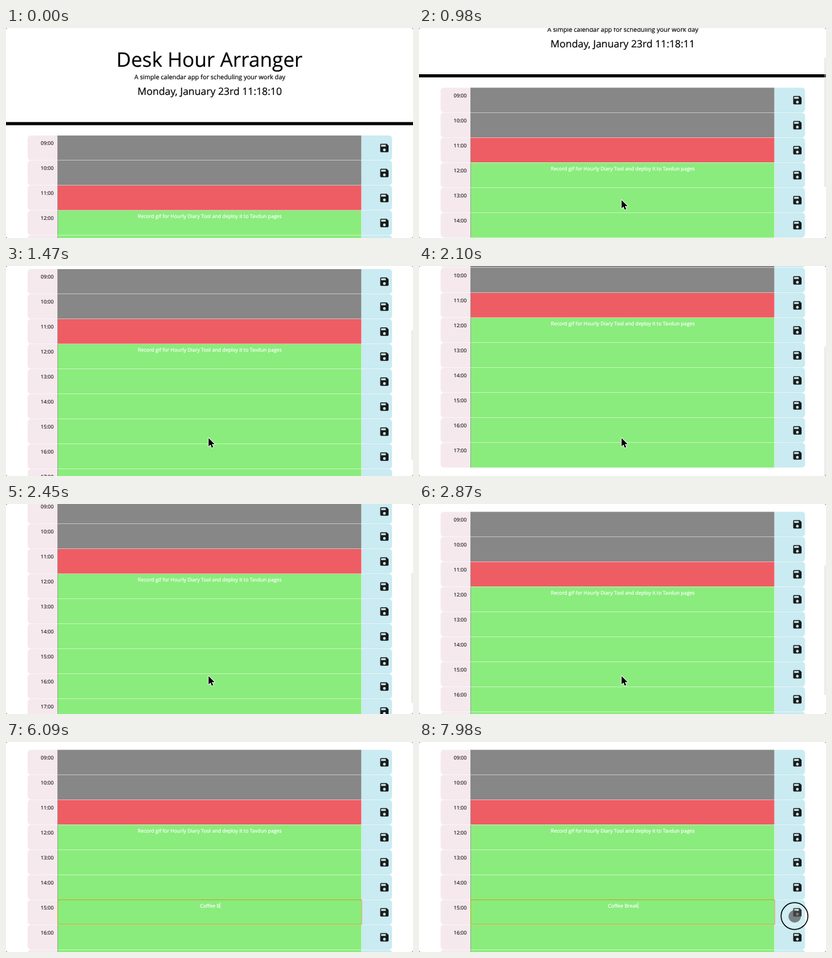
Animation, 650 px wide and 336 px high, one loop 8000 ms. Source, as an HTML page with a canvas:

```html
<!DOCTYPE html>
<html lang="en">
<head>
<meta charset="utf-8">
<title>Desk Hour Arranger</title>
<style>
  html, body { margin: 0; width: 100%; height: 100%; overflow: hidden; background: #fff; }
  canvas { display: block; }
</style>
</head>
<body>
<canvas id="stage" width="650" height="336"></canvas>
<script>
const ctx = document.getElementById('stage').getContext('2d');
const W = 650, H = 336, LOOP = 8000, STEP = 70;
const FIRST_ROW = 172, PITCH = 40, ROW_H = 39.4;
const GREY = '#878787', RED = '#ee5d64', GREEN = '#8aec7c';
const EVENT = 'Record gif for Hourly Diary Tool and deploy it to Tavdun pages';
const TYPED = 'Coffee Break';
const KEY_TIMES = [4340, 4620, 4900, 4970, 5250, 5390, 5740, 6090, 6440, 6580, 6720, 6930];

// [time, scroll offset]: two flicks down, then a gentle one back up
const SCROLL = [
  [700, 0], [770, 5], [840, 24], [910, 50], [980, 76.5], [1120, 112], [1260, 133],
  [1400, 149], [1470, 167], [1540, 207], [1960, 210], [2030, 210], [2100, 209],
  [2170, 206], [2310, 194], [2450, 180], [2590, 169], [2730, 162], [2870, 159.5]
];

const saveIcon = new Path2D(
  'M17 3H5c-1.1 0-2 .9-2 2v14c0 1.1.9 2 2 2h14c1.1 0 2-.9 2-2V7z' +
  'M12 19a3 3 0 1 1 0-6a3 3 0 1 1 0 6zM15 9H5V5h10z');
const arrow = new Path2D('M0 0V14.6L3.3 11.5L5.6 16.8L8 15.8L5.8 10.6H10.4Z');

function keyed(keys, t) {
  if (t <= keys[0][0]) return keys[0][1];
  for (let i = 1; i < keys.length; i++) {
    const [t0, a] = keys[i - 1], [t1, b] = keys[i];
    if (t <= t1) return a + (b - a) * (t - t0) / (t1 - t0);
  }
  return keys[keys.length - 1][1];
}

function rect(x, y, w, h, color, radii = 0) {
  ctx.fillStyle = color;
  ctx.beginPath();
  ctx.roundRect(x, y, w, h, radii);
  ctx.fill();
}

// A hairline stroke gives the text a slightly heavier, smoothed weight
function text(str, x, y, size, color = '#000', align = 'center') {
  ctx.textRendering = 'geometricPrecision';
  ctx.font = `${size}px "Open Sans", sans-serif`;
  ctx.textAlign = align;
  ctx.fillStyle = ctx.strokeStyle = color;
  ctx.lineWidth = 0.2;
  ctx.lineJoin = 'round';
  ctx.fillText(str, x, y);
  ctx.strokeText(str, x, y);
}

function drawHeader(scroll, t) {
  text('Desk Hour Arranger', 325, 62 - scroll, 32);
  text('A simple calendar app for scheduling your work day', 325.5, 82 - scroll, 10);
  text(`Monday, January 23rd 11:18:${t < 840 ? 10 : 11}`, 325.3, 107 - scroll, 16);
  rect(0, 150.5 - scroll, W, 5, '#000');
}

function drawRow(hour, y) {
  const color = hour < 11 ? GREY : hour === 11 ? RED : GREEN;
  rect(34.5, y, 48, ROW_H, '#f5e9ee', [5, 0, 0, 5]);
  rect(568, y, 48.5, ROW_H, '#c9ebf1', [0, 5, 5, 0]);
  rect(82.5, y, 485, ROW_H, color);
  rect(82.4, y, 0.6, ROW_H, '#777');
  text(`${String(hour).padStart(2, '0')}:00`, 76, y + 15.3, 8, '#222', 'right');
  if (hour === 12) text(EVENT, 325.5, y + 12, 8, '#fff');

  ctx.save();
  ctx.translate(604.3, y + 20);
  ctx.scale(0.74, 0.74);
  ctx.translate(-12, -12);
  ctx.fillStyle = '#1a1a1a';
  ctx.fill(saveIcon, 'evenodd');
  ctx.restore();
}

function drawField(y, t) {
  if (t < 3290) return;
  ctx.strokeStyle = '#c6a02c';
  ctx.lineWidth = 1;
  ctx.strokeRect(82.5, y, 485.5, ROW_H);
  const str = TYPED.slice(0, KEY_TIMES.filter(k => k <= t).length);
  text(str, 325.7, y + 12, 8, '#fff');
  if (t >= 3360) rect(325.7 + ctx.measureText(str).width / 2, y + 4, 0.8, 10, '#fff');
}

function drawArrow(x, y) {
  ctx.save();
  ctx.translate(x, y);
  ctx.scale(0.92, 0.92);
  ctx.lineJoin = 'round';
  ctx.lineWidth = 2;
  ctx.strokeStyle = '#fff';
  ctx.stroke(arrow);
  ctx.fillStyle = '#000';
  ctx.fill(arrow);
  ctx.restore();
}

function circle(x, y, r) {
  ctx.beginPath();
  ctx.arc(x, y, r, 0, Math.PI * 2);
}

function drawDot(x, y, r) {
  circle(x, y, r);
  ctx.fillStyle = 'rgba(70,70,70,.65)';
  ctx.fill();
}

function drawRing(x, y, r) {
  circle(x, y, r);
  ctx.fillStyle = 'rgba(255,255,255,.12)';
  ctx.fill();
  ctx.strokeStyle = '#000';
  ctx.lineWidth = 1.5;
  ctx.stroke();
}

function drawPointer(t) {
  if (t >= 280 && t < 3150) {
    drawArrow(323.5, t < 350 ? 282.4 : 275.2);
  } else if (t >= 3150 && t < 4340) {
    if (t < 3500) drawRing(323.5, 276.5, t < 3290 ? 23.5 : 22.5);
    drawDot(324, 277, t < 4130 ? 10.5 : 9);
  } else if (t >= 7350 && t < 7980) {
    const p = (t - 7350) / 560;
    const e = p * p * (3 - 2 * p);
    drawArrow(346 + 254 * e, 280 - 2 * e + 18 * Math.sin(Math.PI * e));
  } else if (t >= 7980) {
    drawRing(599.7, 278.5, 21.4);
    drawDot(600, 279, 10);
  }
}

function drawCorners() {
  ctx.fillStyle = '#777';
  ctx.beginPath();
  ctx.rect(0, 0, W, H);
  ctx.roundRect(0, 0, W, H, 3);
  ctx.fill('evenodd');
}

function draw(now) {
  const t = Math.floor((now % LOOP) / STEP) * STEP;
  const scroll = keyed(SCROLL, t);
  rect(0, 0, W, H, '#fff');
  drawHeader(scroll, t);
  for (let hour = 9; hour <= 17; hour++) {
    drawRow(hour, FIRST_ROW + (hour - 9) * PITCH - scroll);
  }
  drawField(FIRST_ROW + 6 * PITCH - scroll, t);
  if (t >= 770 && t < 3500) {
    const ratio = H / 545;
    rect(648, scroll * ratio, 1, H * ratio, '#d2d2d2');
  }
  drawPointer(t);
  drawCorners();
}

const start = performance.now();
function tick() {
  draw(performance.now() - start);
  requestAnimationFrame(tick);
}
tick();
</script>
</body>
</html>
```
